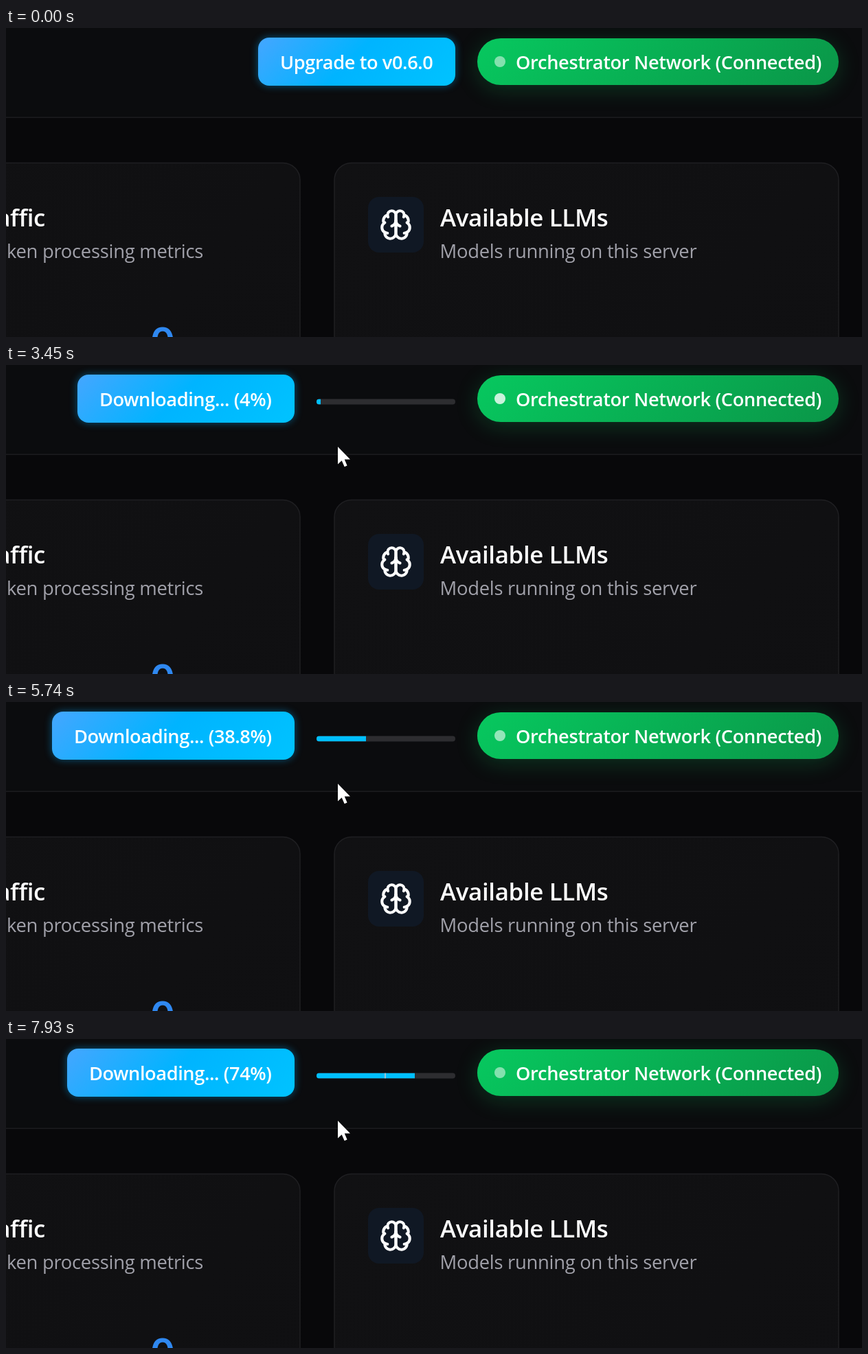
An HTML page for the animation above (8 s loop, 1246 by 450 pixels).

```html
<!DOCTYPE html>
<html lang="en">
<head>
<meta charset="utf-8">
<title>Server dashboard</title>
<style>
  html, body { margin: 0; width: 100%; height: 100%; overflow: hidden; background: #08080a; }
  #stage { position: relative; width: 1246px; height: 450px; overflow: hidden; }
  #stage > * { position: absolute; box-sizing: border-box; }
  svg { left: 0; top: 0; }
  text { font-family: "Open Sans", "Noto Sans", sans-serif; letter-spacing: -.25px; }
  .label { font-size: 27.2px; font-weight: 600; fill: #fff; letter-spacing: -.3px; }
  .title { font-size: 34.9px; font-weight: 600; fill: #fff; letter-spacing: -.35px; }
  .sub { font-size: 27.4px; fill: #a1a1aa; letter-spacing: -.28px; }
  .count { font-size: 64px; font-weight: 600; fill: #2f88f0; }
  #action { letter-spacing: -.4px; }
  #button {
    top: 14px; height: 70px; border-radius: 16px; overflow: hidden;
    background: linear-gradient(135deg, #45a6ff, #00b4ff 47%, #00c3ff);
    box-shadow: 0 0 12px rgba(0, 175, 255, .45);
  }
  #sheen {
    position: absolute; top: 0; width: 100%; height: 100%;
    background: linear-gradient(90deg, transparent, rgba(255, 255, 255, .18), transparent);
  }
  #pill {
    left: 686px; top: 15px; width: 526px; height: 68px; border-radius: 34px;
    background: linear-gradient(135deg, #07c85f, #0a9648);
    box-shadow: 0 6px 32px rgba(16, 185, 90, .24);
  }
  #dot { left: 711px; top: 41px; width: 16px; height: 16px; border-radius: 50%; background: #fff; }
  #track {
    left: 452px; top: 49px; width: 202px; height: 8px; border-radius: 4px;
    background: #2d2d30; overflow: hidden; transform: translateY(.5px);
  }
  #track div { position: absolute; top: 0; height: 100%; }
  #fill { left: 0; background: #00bfff; }
  #tick { left: 99px; width: 2px; background: #9cc3d2; }
</style>
</head>
<body>
<div id="stage">
  <svg width="1246" height="450">
    <defs>
      <linearGradient id="surface" x1="0" y1="0" x2="1" y2="1">
        <stop offset="0" stop-color="#111113"/>
        <stop offset="1" stop-color="#0f0f11"/>
      </linearGradient>
      <g id="half">
        <path d="M12 5a3 3 0 1 0-5.997.125 4 4 0 0 0-2.526 5.77 4 4 0 0 0 .556 6.588A4 4 0 1 0 12 18Z"/>
        <path d="M12 9a4.5 4.5 0 0 1-3 4M6.003 5.125A3 3 0 0 0 6.401 6.5M3.477 10.896a4 4 0 0 1 .585-.396M6 18a4 4 0 0 1-1.967-.516"/>
      </g>
    </defs>
    <rect width="1246" height="130" fill="#0b0c0e"/>
    <rect y="129.5" width="1246" height="1.5" fill="#1c1c1f"/>
    <rect x="-306" y="196.5" width="734" height="800" rx="25" fill="url(#surface)" stroke="#1f1f22" stroke-width="1.5"/>
    <text class="title" x="57" y="289" text-anchor="end">Traffic</text>
    <text class="sub" x="287" y="335" text-anchor="end">Token processing metrics</text>
    <text class="count" x="228" y="481" text-anchor="middle">0</text>
    <g id="card">
      <rect id="frame" x="478" y="196.5" width="734" height="800" rx="25" fill="url(#surface)" stroke="#1f1f22" stroke-width="1.5"/>
      <rect x="527" y="246" width="81" height="81" rx="16" fill="#101824"/>
      <g transform="translate(543.2 262.2) scale(2.025)" fill="none" stroke="#fff" stroke-width="2" stroke-linecap="round" stroke-linejoin="round">
        <use href="#half"/>
        <use href="#half" transform="translate(24 0) scale(-1 1)"/>
      </g>
      <text class="title" x="632" y="289">Available LLMs</text>
      <text class="sub" x="631.5" y="335">Models running on this server</text>
    </g>
  </svg>
  <div id="pill"></div>
  <div id="dot"></div>
  <div id="track"><div id="fill"></div><div id="tick"></div></div>
  <div id="button"><div id="sheen"></div></div>
  <svg width="1246" height="450">
    <text class="label" id="action" y="60"></text>
    <text class="label" x="742" y="60">Orchestrator Network (Connected)</text>
    <path id="cursor" d="M0 0V25.5L5.7 20.2L9.7 29.3L13.6 27.6L9.8 18.6H18Z" fill="#fff" stroke="#000" stroke-opacity=".5" stroke-width="1" paint-order="stroke"/>
  </svg>
</div>
<script>
const LOOP = 8000, FRAME = 70, CLICK = 1690, BAR_LAG = 190;

const percentKeys = [[0, 0], [2490, 0], [3450, 4], [4750, 22.3], [5740, 38.8], [7040, 59.8], [7930, 74], [8000, 75.1]];
const xKeys = [[340, 690], [700, 612], [1140, 536], [1300, 519], [1760, 517], [2300, 483]];
const yKeys = [[340, 462], [700, 284], [1140, 87], [1300, 53], [1760, 52], [2300, 119]];
const hoverKeys = [[390, 0], [660, 1], [880, 1], [1140, 0]];

const $ = id => document.getElementById(id);
const [button, sheen, dot, track, fill, tick, action, cursor, card, frame] =
  ["button", "sheen", "dot", "track", "fill", "tick", "action", "cursor", "card", "frame"].map($);

// Linear value at time t; a step holds the clock inside each segment.
function valueAt(keys, t, step = 0) {
  if (t <= keys[0][0]) return keys[0][1];
  for (let i = keys.length - 1; i >= 0; i--) {
    const [t0, a] = keys[i];
    if (t < t0) continue;
    if (i === keys.length - 1) return a;
    const [t1, b] = keys[i + 1];
    const dt = step ? Math.floor((t - t0) / step) * step : t - t0;
    return a + (b - a) * dt / (t1 - t0);
  }
}

function drawButton(t) {
  const loading = t >= CLICK;
  let left = 367, width = 287, label = "Upgrade to v0.6.0";
  if (loading) {
    const number = String(+valueAt(percentKeys, t, FRAME).toFixed(1));
    const dots = number.includes(".") ? 1 : 0;
    width = 316 + 15 * (number.length - dots - 1) + 7 * dots;
    left = 420 - width;
    label = `Downloading... (${number}%)`;
  }
  button.style.left = left + "px";
  button.style.width = width + "px";
  action.setAttribute("x", left + 32);
  if (action.textContent !== label) action.textContent = label;
  sheen.style.left = Math.min(1, Math.max(-1, (t - 1200) / 225 - 1)) * 100 + "%";

  const bar = valueAt(percentKeys, t - BAR_LAG) * 2.02;
  track.style.display = loading ? "block" : "none";
  fill.style.width = bar + "px";
  tick.style.display = bar > 101 ? "block" : "none";
}

function draw(t) {
  drawButton(t);
  dot.style.opacity = .75 - .25 * Math.cos(Math.PI * t / 1000);

  const hover = valueAt(hoverKeys, t);
  const scale = 1 + .01 * hover;
  card.setAttribute("transform", `translate(845 596) scale(${scale}) translate(-845 -596)`);
  frame.setAttribute("stroke", `rgb(${31 + 14 * hover},${31 + 14 * hover},${34 + 14 * hover})`);

  cursor.setAttribute("visibility", t < 340 ? "hidden" : "visible");
  cursor.setAttribute("transform", `translate(${valueAt(xKeys, t)} ${valueAt(yKeys, t)})`);
}

function tickClock() {
  draw(performance.now() % LOOP);
  requestAnimationFrame(tickClock);
}
tickClock();
</script>
</body>
</html>
```
